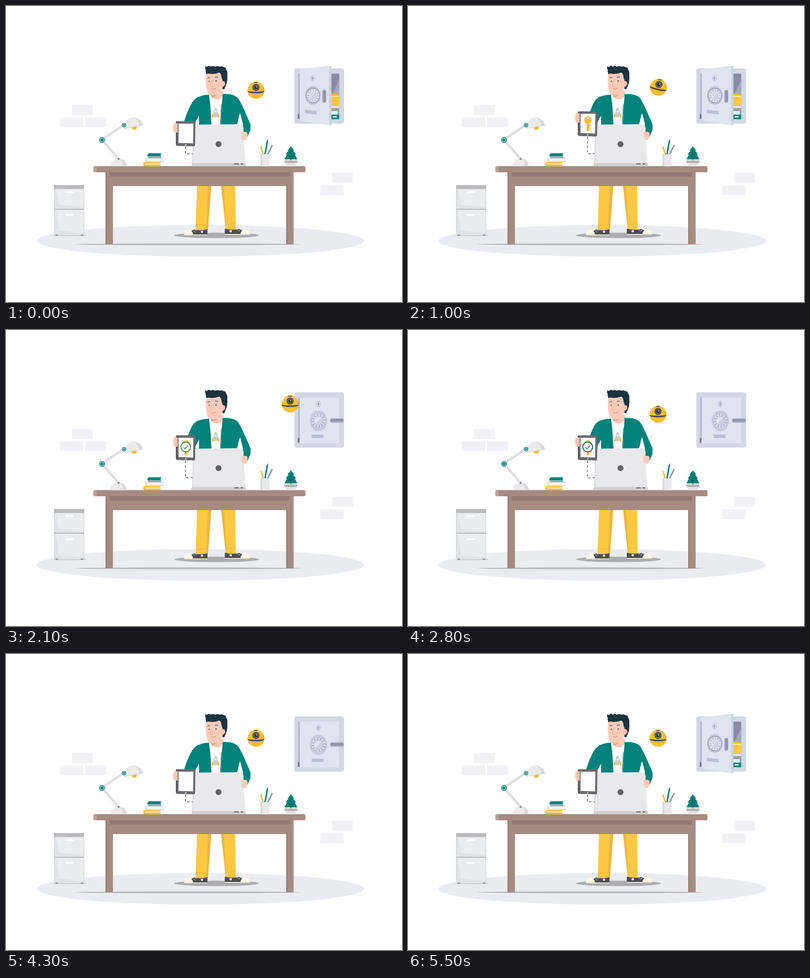
An HTML page for the animation above (5.6 s loop, 800 px wide and 600 px high).

```html
<!DOCTYPE html>
<html lang="en">
<head>
<meta charset="utf-8">
<title>Desk and safe</title>
<style>
html, body { margin: 0; width: 100%; height: 100%; overflow: hidden; background: #fff; }
svg { display: block; width: 100vw; height: 100vh; }
</style>
</head>
<body>
<svg viewBox="0 0 800 600">
  <defs>
    <clipPath id="ball"><circle r="17.2"/></clipPath>
    <clipPath id="box"><rect x="593" y="137" width="81" height="93"/></clipPath>
  </defs>

  <ellipse cx="392.500" cy="476" rx="331" ry="32" fill="#ebecf0"/>
  <path d="M133 201h42v20h-42zM109 226h47v19h-47zM160 226h42v19h-42zM659 338h42v20h-42zM635 364h47v19h-47z" fill="#f2f2f6"/>

  <!-- cabinet -->
  <g>
    <path d="M97 464h64v2.500h-64z" fill="#cfcfd3"/>
    <path d="M100 463h5v3h-5zM151 463h5v3h-5z" fill="#9b9b9f"/>
    <path d="M97 371h61v92h-61z" fill="#ebecee"/>
    <path d="M97 371h4l6 32l51 5v3h-61zM97 414h4l6 41l51 6v2h-61z" fill="#e2e3e6"/>
    <path d="M97 363h61v8h-61z" fill="#bbbbbe"/>
    <path d="M97 411h61v2h-61z" fill="#b9b9bd"/>
    <path d="M97.500 371v92M157.500 371v92" stroke="#cdcdd1"/>
    <rect x="119" y="375.500" width="17" height="4" rx="1.500" fill="#fff"/>
    <rect x="119" y="422" width="17" height="4" rx="1.500" fill="#fff"/>
  </g>

  <!-- safe -->
  <g>
    <rect x="582" y="126.500" width="101" height="112" rx="5" fill="#d0d7e5"/>
    <path d="M582.500 131v103q0 4.500 5 4.500h90" fill="none" stroke="#e6eaf3" stroke-width="1.500"/>
    <g clip-path="url(#box)">
      <path d="M593 137h81v93h-81z" fill="#a3a9be"/>
      <path d="M593 137h81v9l-14 32h-67z" fill="#858ca4"/>
      <path d="M593 203h81v4h-81z" fill="#dbe1ec"/>
      <path d="M593 207h81v23h-81z" fill="#969db3"/>
      <path d="M640 177h28l5 3v23h-33z" fill="#f3b530"/>
      <path d="M640 181h33v22h-33z" fill="#ffc843"/>
      <path d="M640 183h33" stroke="#fff0c2" stroke-width="1.300"/>
      <path d="M640 213h30v7h-30z" fill="#e9edf5"/>
      <path d="M640 220h33v9h-33z" fill="#03827b"/>
      <path d="M660 223h8v3h-8z" fill="#e9f3f3"/>
      <path d="M673.500 137v93" stroke="#bcc4d5"/>
    </g>
    <path id="face" fill="#dee4f0"/>
    <path id="edge" fill="#cbd2e1"/>
    <path d="M592 137v93" stroke="#8f97ad" stroke-width="1.500"/>
    <path d="M589.500 219h3.500v9h-3.500z" fill="#6f7890"/>
    <g id="lock">
      <ellipse rx="4.500" ry="6" fill="#b2bbd0"/>
      <ellipse rx="3.200" ry="4.500" fill="#dbe1ee"/>
      <circle cy="-1" r="1.500" fill="#7c859d"/><path d="M0 0v3" stroke="#7c859d" stroke-width="1.300"/>
    </g>
    <g id="dial">
      <ellipse id="halo" fill="#c3cbdc"/>
      <circle r="14" fill="#b6bfd2"/>
      <circle r="11.500" fill="none" stroke="#e9edf5" stroke-width="4" stroke-dasharray="2.200 3.820"/>
      <circle r="8.500" fill="#dfe4ee"/>
      <g id="rim">
        <circle r="16.500" fill="#a9b2c8"/>
        <circle r="13.300" fill="#dfe4ee"/>
        <circle r="10.500" fill="none" stroke="#8d96ad" stroke-width="3" stroke-dasharray="1.200 4.300"/>
        <circle r="7.500" fill="#d3dae7"/>
      </g>
      <path d="M-6 6A8.500 8.500 0 0 0 6 -6z" fill="#cbd2e1"/>
    </g>
    <path id="slot" d="M-12 -3.500h24v7h-24z" fill="#b7c0d4"/>
    <g id="grip">
      <rect x="-14" y="-4.500" width="28" height="9" rx="4" fill="#aab2c5"/>
      <rect x="-13" y="-3" width="26" height="5" rx="2.500" fill="#8d95aa"/>
    </g>
  </g>

  <!-- lower body -->
  <ellipse cx="425.500" cy="465" rx="86" ry="5.500" fill="#acacae"/>
  <path d="M386 360h29l-7 94q-13 2-25-1z" fill="#ffc843"/>
  <path d="M415 360l-7 94l-4-1l4-93zM384 443l24 1v1.500l-24-1z" fill="#e9b842"/>
  <path d="M434 360h29l1 93q-10 3-19 1z" fill="#ffc843"/>
  <path d="M434 360h6l6 94h-2zM444 442l20-1v1.500l-20 1z" fill="#e9b842"/>
  <g id="shoe">
    <path d="M380 453q14 3 27-.5v11.500h-40q6-9 13-11z" fill="#4c4d50"/>
    <path d="M360 464q-1-7 9-11.500q8 2 9 11.500z" fill="#fff9e6"/>
    <path d="M360 463h47v1.800h-47z" fill="#e9e5d8"/>
    <path d="M378 455l4 3m0-5l3 3" stroke="#fff" stroke-width=".8"/>
    <circle cx="396" cy="457.500" r="2.300" fill="#fff"/>
  </g>
  <use href="#shoe" transform="translate(883.6 -1) scale(-1.085 1)"/>

  <!-- upper body -->
  <path d="M409 180h27l8 66h-36z" fill="#fff"/>
  <path d="M411 172h27v10q-5 7-10 8q-12-1-15-8z" fill="#ffcab7"/>
  <path d="M413 177h14q-3 8-12 8z" fill="#f19f87"/>
  <g>
    <path d="M420 216l-4 5v6l5-3zM427 216l4 5v6l-5-3z" fill="#fbbd35"/>
    <path d="M423.500 205q6 7 3.500 20h-7q-2.500-13 3.500-20z" fill="#c9ccd0"/>
    <circle cx="423.500" cy="214" r="1.700" fill="#fff"/>
    <path d="M421 225h5l-2.500 5z" fill="#e9ecef"/>
  </g>
  <path id="sleeve" fill="#03827b"/>
  <path d="M410 179.500q-12 1-18 6l-3 59h25q1-33-4-65z" fill="#03827b"/>
  <path d="M438 178.500q20-2 30 7.500q5 4 26 54v11l-6 14l-9-3l1-14l-8-30l-6 26h-32q1-38 4-65.500z" fill="#03827b"/>
  <path d="M473 217l6 24h-13q6-12 7-24z" fill="#fff"/>
  <path d="M410 179.500q-2 12-3 16l4 4l4 44M438 178.500l1 17l-4 5l-2 43" fill="none" stroke="#026e68"/>
  <path d="M390 222v19l-8-2l2-6z" fill="#fff"/>

  <!-- head -->
  <path d="M405 135q-2 14-1 25q2 17 8 20q13 4 21-7l6-9v-26z" fill="#ffcab7"/>
  <path d="M404 138q1-3-1-6l1-2q-3-3-1-8l3 2q1-3 5-3l2 2q5-3 9 0q5-2 10 0q5-2 7 1q6 0 5 4q4 4 3 11q1 8-1 17l-5 13l-4-1l2-10l-2-9q-2-4-2-8q-1-4-4-6q-11 4-21 2q-4 0-6 1z" fill="#1d3340"/>
  <path d="M437 153q3-2 5 1q2 4-1 8q-2 2-4 1z" fill="#ffcab7"/>
  <path d="M439 155q3 0 1 5" fill="none" stroke="#e99c86"/>
  <path d="M407 146q3-2 5 0M422 145q3-2 6 0" fill="none" stroke="#1d3340" stroke-width="1.200"/>
  <circle cx="410.500" cy="152.500" r="1.100" fill="#1d3340"/>
  <circle cx="424.500" cy="152" r="1.200" fill="#1d3340"/>
  <path d="M415 151l-2 12q2 2 5 1" fill="none" stroke="#f0ab97"/>
  <path d="M414 168q6 2 11-2" fill="none" stroke="#c9786a"/>

  <!-- desk -->
  <ellipse cx="369" cy="483" rx="231" ry="1.800" fill="#b6b6ba"/>
  <path d="M201 337h15v146h-15zM566 337h15v146h-15z" fill="#a68b81"/>
  <path d="M201 337h3v146h-3zM566 337h3v146h-3z" fill="#9a7e74"/>
  <path d="M205 337h376v28h-376z" fill="#a68b81"/>
  <path d="M209 337h364v8.500h-364z" fill="#927870"/>
  <rect x="176.500" y="324.500" width="428.500" height="12.500" rx="3.500" fill="#a68b81"/>
  <path d="M180 324.500h3v12.500h-3q-3.500 0-3.500-4v-5q0-3.500 3.500-3.500z" fill="#baa298"/>

  <!-- lamp -->
  <path d="M211 324.500q2-15 17-15q14 0 16 15z" fill="#ebebed"/>
  <path d="M231 309.500q11 2 13 15h-9q2-9-4-15z" fill="#d9d9dc"/>
  <path d="M227 310L194 271L238 241" fill="none" stroke="#c9cacd" stroke-width="4.500"/>
  <path d="M227 310L194 271L238 241" fill="none" stroke="#e4e4e7" stroke-width="3"/>
  <circle cx="259" cy="246" r="5.300" fill="#fbbd35"/>
  <path d="M239 248.500q-1-18 16-22.500q16-1 22 15.500z" fill="#ebebed"/>
  <path d="M258 226q14 1 19 15.500l-8 1.500q-1-12-11-17z" fill="#dadadd"/>
  <path d="M239 248.500l38-7" stroke="#c6c6ca" stroke-width=".8"/>
  <g fill="#03827b" stroke="#fff">
    <circle cx="194" cy="271.500" r="5.300" stroke="#03827b"/><circle cx="194" cy="271.500" r="3.700"/>
    <circle cx="238.500" cy="241.500" r="4" stroke="#03827b"/><circle cx="238.500" cy="241.500" r="2.600"/>
    <circle cx="227.500" cy="310" r="3" fill="#8c93a6"/>
  </g>

  <!-- books -->
  <path d="M279 316.500h33v8.500h-33q-4-4 0-8.500z" fill="#fbbd35"/>
  <path d="M281 319h31v2.500h-31z" fill="#ffe9b4"/>
  <path d="M283 308h36q2 4 0 8h-36q-4-4 0-8z" fill="#d9dade"/>
  <path d="M284 310h36v4h-36z" fill="#f6f6f8"/>
  <path d="M288 298.500h26q-3 4 0 9h-26q-5-4 0-9z" fill="#03827b"/>
  <path d="M287 305.500h27" stroke="#d9eeea" stroke-width="1.300"/>

  <!-- pens, plant -->
  <path d="M520 302L515 285" stroke="#fbbd35" stroke-width="3"/>
  <path d="M523 302L528 274" stroke="#03827b" stroke-width="3"/>
  <path d="M528 302L538 282" stroke="#9096a6" stroke-width="3"/>
  <path d="M528 275l1-4" stroke="#1d3340" stroke-width="1.300"/>
  <path d="M514 300h18.500v25h-18.500z" fill="#e9e9eb"/>
  <path d="M514 300h4v25h-4z" fill="#dadade"/>
  <path d="M514 300.500h18.500" stroke="#c9c9ce"/>
  <path d="M575.500 284.500l7 8.500h-2.500l6 8h-2.500l5 10h-26l5-10h-2.500l6-8h-2.500z" fill="#03827b"/>
  <path d="M575.500 292v22M576 302l5-4M575 306l-5-4" stroke="#02605a" stroke-width="1.200"/>
  <path d="M562 313h27q-1 10-9 12h-9q-8-2-9-12z" fill="#e3e3e6"/>
  <path d="M562 313h27q0 2-.5 4q-13 3-26 0z" fill="#b4b5ba"/>

  <!-- laptop, right hand -->
  <path d="M476 256q7-2 11 0q2 5 0 11q-2 5-6 5q-5-1-7-7z" fill="#ffcab7"/>
  <path d="M379 242.500q0-2 3-2l93-1q3 0 3.500 3l5 78h-107z" fill="#e9e9eb"/>
  <path d="M378 243l2 0l-2 77h-2zM376 318h108v2h-108z" fill="#d9d9dc"/>
  <path d="M375 319h109q2 3-1 6h-107q-2-2-1-6z" fill="#cfcfd2"/>
  <path d="M461 320h9M474 320h5" stroke="#606165" stroke-width="1.800"/>
  <path d="M475 256q7-1 8 3l-4 2q5 1 4 4l-4 1q3 3 0 5l-3-2z" fill="#ffcab7"/>
  <circle cx="429.300" cy="280" r="6" fill="#606165"/>

  <!-- tablet, in its low place -->
  <path id="cord" fill="none" stroke="#68696c" stroke-width="1.400" stroke-dasharray="5 4"/>
  <g id="tablet">
    <path d="M346 233.500h34q2.500 0 2.500 3l-.5 45q0 3-3 3l-33-1q-2.500 0-2.500-3l-.5-44q0-3 3-3z" fill="#68696d"/>
    <path d="M343.500 235l2 0v48l-2-2z" fill="#4e4f53"/>
    <path d="M348.500 238.500h30l-.5 40l-29.500-1z" fill="#fff"/>
    <circle cx="363" cy="281.300" r="1.500" fill="#d7d7da"/>
    <g fill="#ffcab7">
      <rect x="338" y="237.500" width="9" height="5.500" rx="2.700"/>
      <rect x="337" y="242.500" width="10" height="5.500" rx="2.700"/>
      <rect x="337.500" y="247.500" width="9.500" height="5.500" rx="2.700"/>
      <rect x="339" y="252" width="8" height="4.500" rx="2.200"/>
    </g>
    <path d="M340 243h7M340 248h7M341 252.500h6" stroke="#eba691" stroke-width=".7"/>
    <g id="key">
      <circle cy="-7.500" r="7.600" fill="#fbbb2b"/>
      <path d="M-2.500 -1h5v3.500h3.500v3h-3.500v2h3v3h-3v3.500l-2.500 2.500l-2.500-2.500z" fill="#fbbb2b"/>
      <circle cy="-11" r="2.100" fill="#fff"/>
      <path d="M-.8 0v13" stroke="#e5a41f" stroke-width=".8"/>
    </g>
    <g id="check">
      <circle r="10" fill="#fff" stroke="#217a58" stroke-width="2"/>
      <path d="M-5 .5l3.500 3.500l6.500-7" fill="none" stroke="#217a58" stroke-width="1.600"/>
    </g>
  </g>

  <!-- robot -->
  <g id="robot">
    <g clip-path="url(#ball)">
      <circle r="17.200" fill="#fbc02f"/>
      <path d="M10 -18q9 18 -2 38h20v-38z" fill="#f2b326"/>
      <path d="M-6 -19h12q0 4-6 4t-6-4z" fill="#4b4c50"/>
    </g>
    <path d="M-17.500 1.500q17.500 2.500 35 0q-1 4.500-17.500 4.500t-17.500-4.500z" fill="#4b4c50"/>
    <circle cy="-6" r="7.300" fill="#505155"/>
    <circle cy="-6" r="5" fill="#797b80"/>
    <circle cy="-6" r="3.600" fill="#2d2e32"/>
    <circle cx="1" cy="-7" r="1.200" fill="#c9ccd2"/>
  </g>
</svg>
<script>
const LOOP = 5600, STEP = 100;
const el = id => document.getElementById(id);
const lerp = (a, b, p) => a + (b - a) * p;
const soft = p => p * p * (3 - 2 * p);

// keys: [time, value...]
function track(keys, t, ease = p => p) {
  let i = 0;
  while (i < keys.length - 1 && keys[i + 1][0] <= t) i++;
  const a = keys[i], b = keys[i + 1];
  if (!b || t <= a[0]) return a.slice(1);
  const p = ease((t - a[0]) / (b[0] - a[0]));
  return a.slice(1).map((v, n) => lerp(v, b[n + 1], p));
}

function mixPath(a, b, p) {
  const nums = b.match(/-?[\d.]+/g);
  let i = 0;
  return a.replace(/-?[\d.]+/g, v => lerp(+v, +nums[i++], p).toFixed(2));
}

const set = (id, name, value) => el(id).setAttribute(name, value);
const place = (id, x, y, rest = '') => set(id, 'transform', `translate(${x} ${y}) ${rest}`);
const shape = (id, a, b, p) => set(id, 'd', mixPath(a, b, p));

const LIFT = [[0, 0], [150, 0], [650, 1], [3700, 1], [4200, 0]];
const KEY = [[0, 0], [650, 0], [850, 1.12], [950, 1], [3500, 1], [3800, 0]];
const CHECK = [[0, 0], [1950, 0], [2150, 1], [3300, 1], [3600, 0]];
const DOOR = [[0, 1], [1700, 1], [1800, .15], [1900, 0], [5000, 0], [5500, 1]];
const TURN = [[0, 1], [1800, 1], [1900, 0], [4700, 0], [5000, 1]];
const FLY = [[0, 505, 171, 0], [900, 505, 171, 0], [1000, 505.5, 165, 13],
  [1200, 554, 151, 9], [1400, 584, 134, 0], [1700, 582, 138, 0],
  [1800, 686, 140, 6], [2100, 574, 150, 0], [2400, 565, 169, -5], [2800, 505, 171, 0]];

function drawDoor(u, turn) {
  shape('face', 'M593 137L674 137L674 230L593 230Z', 'M593 128L656 121L656 242L593 232Z', u);
  shape('edge', 'M673 137L674 137L674 230L673 230Z', 'M653 121.500L657.500 122L657.500 241L653 241.500Z', u);
  place('lock', lerp(631, 619, u), lerp(150, 147, u), `scale(${lerp(1, .92, u)} 1)`);
  place('dial', lerp(631, 620, u), lerp(184, 181.5, u), `scale(${lerp(1, .93, u)} 1)`);
  set('halo', 'rx', lerp(17.5, 16.5, u));
  set('halo', 'ry', lerp(21, 19.5, u));
  set('rim', 'opacity', u);
  place('slot', lerp(629.5, 615.5, u), lerp(215.5, 215, u), `skewY(${7 * u})`);
  place('grip', lerp(668.5, 643, u), lerp(183.5, 183, u), `rotate(${90 * turn}) scale(${lerp(1, .95, u)})`);
}

function draw(t) {
  const [lift] = track(LIFT, t, soft);
  const [size] = track(KEY, t);
  const [seen] = track(CHECK, t, soft);
  const [x, y, tilt] = track(FLY, t);

  place('tablet', 0, -20 * lift);
  place('key', 363.5, 258.5, `scale(${size})`);
  place('check', 363, 257, `scale(${lerp(.85, 1, seen)})`);
  set('check', 'opacity', seen);
  set('cord', 'd', `M362.5 ${285 - 20 * lift}V299.500H377`);
  shape('sleeve',
    'M404 180Q386 182 377 194Q367 210 359 237L384 240L391 224L404 200Z',
    'M404 180Q386 182 379 190Q372 200 367 217L383 241L391 226L404 200Z', lift);
  drawDoor(track(DOOR, t, soft)[0], track(TURN, t, soft)[0]);
  place('robot', x, y, `rotate(${tilt})`);
}

const start = performance.now();
function tick() {
  const t = (performance.now() - start) % LOOP;
  draw(Math.floor(t / STEP) * STEP);
  requestAnimationFrame(tick);
}
tick();
</script>
</body>
</html>
```
